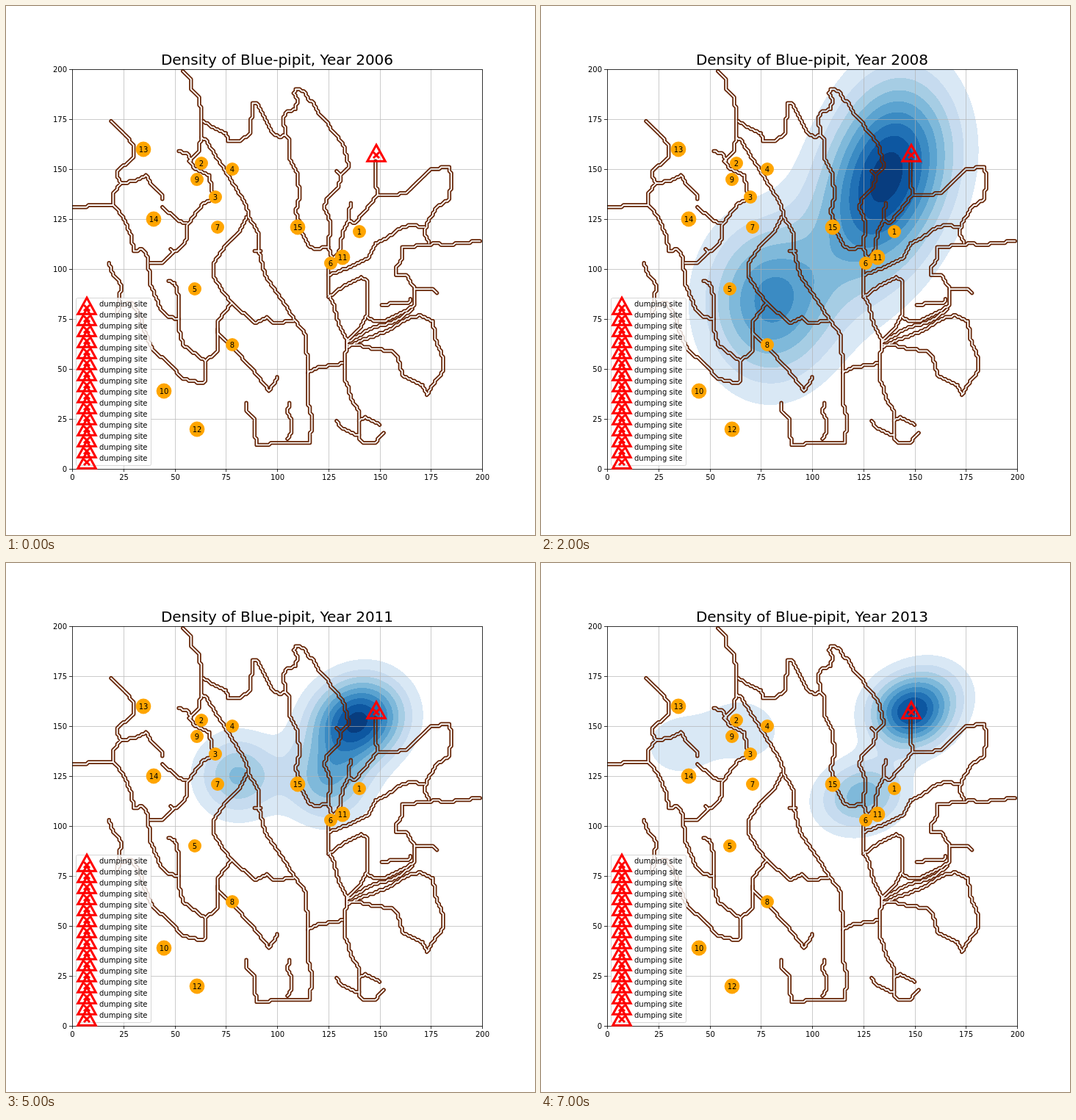
Animation of 720 by 720 pixels, one loop 8000 ms. Source, as an HTML page with a canvas:

```html
<!DOCTYPE html>
<html lang="en">
<head>
<meta charset="utf-8">
<title>Density map</title>
<style>
html, body { margin: 0; width: 100%; height: 100%; overflow: hidden; background: #fff; }
canvas { position: absolute; left: 90px; top: 86px; }
svg { position: absolute; left: 0; top: 0; }
text { font: 10px "DejaVu Sans", sans-serif; }
#title { font-size: 20px; }
.mid { text-anchor: middle; }
.end { text-anchor: end; }
</style>
</head>
<body>
<canvas id="density" width="558" height="544"></canvas>
<svg width="720" height="720" viewBox="0 0 720 720">
  <defs>
    <g id="roads" fill="none" stroke-linecap="round" stroke-linejoin="round">
      <polyline points="144,156 160,172 174,190 173,206 151,224 152,234 158,240 147,254 146,270 160,286 164,300 172,315 173,333 186,331 194,342 195,380 202,392 210,412 220,422 234,427"/>
      <polyline points="84,274 108,274 113,271 136,271 146,272"/>
      <polyline points="158,240 175,238 190,230 196,242 212,258 213,263"/>
      <polyline points="196,350 212,350 225,338 242,324 246,318 245,298 255,288 268,268 284,260"/>
      <polyline points="214,275 230,287 240,296 246,295"/>
      <polyline points="223,331 228,336"/>
      <polyline points="242,90 251,99 252,112 262,125 266,150 267,178 262,188 263,198 250,210 258,222 276,231 279,250 285,262"/>
      <polyline points="236,198 245,201 252,210"/>
      <polyline points="267,178 272,180 288,208 303,230 318,257 328,270 330,287 344,308 345,330 352,365 375,400 395,430 409,447 411,500 410,540 416,562 413,594 362,594 357,598 341,597 338,582 337,562 328,550 327,541"/>
      <polyline points="338,333 348,333"/>
      <polyline points="268,157 285,167 300,172 303,184 318,184 332,172 336,133 342,133 352,152 360,170 372,179 381,177"/>
      <polyline points="381,177 377,150 384,143 395,140 397,126 391,119 395,114 401,112 408,120 411,128 420,131 425,146 437,157 443,170 457,186 463,205 467,218 455,230 452,247 435,263 433,275 441,295 440,328"/>
      <polyline points="450,226 455,230"/>
      <polyline points="381,177 385,180 387,205 397,230 399,260 395,280 402,305 412,325 420,331 440,327"/>
      <polyline points="440,327 443,345 438,360 438,392 446,410 452,435 463,455 460,487 462,510 468,520 470,535 481,550 481,590 486,595 502,594 508,586 514,580"/>
      <polyline points="481,565 490,560 500,566 508,570"/>
      <polyline points="449,566 456,573 470,580 481,583"/>
      <polyline points="438,395 462,380 482,368 491,373 491,420 480,440 463,455"/>
      <polyline points="440,367 470,355 495,342 503,322 520,315 540,300 553,298 571,300"/>
      <polyline points="503,212 503,240 507,258 523,258 545,255 560,242 577,222 602,219 607,235 604,262 588,275 572,295 570,308 576,322"/>
      <polyline points="507,258 495,272 485,282 475,296 468,293 466,283 470,268"/>
      <polyline points="468,291 458,307 456,325 452,335 443,345"/>
      <polyline points="645,320 620,322 600,326 585,322 573,325 540,327 538,345 532,355 532,365 545,366 553,380 556,385 580,384 587,390"/>
      <polyline points="556,385 555,408 540,418 515,428 500,429 491,422"/>
      <polyline points="511,407 530,405 548,403 550,400"/>
      <polyline points="463,463 490,452 520,443 545,427 565,420 582,428 585,450 594,480 594,498 580,515 573,530 566,517 540,502 533,478 525,470 500,467 480,462 465,460"/>
      <polyline points="463,458 495,440 530,428 553,412"/>
      <polyline points="411,500 425,490 450,488 459,487"/>
      <polyline points="328,288 318,305 300,325 283,350 283,370 296,392 308,405 337,432 355,422 363,432 392,430"/>
      <polyline points="308,403 288,430 289,445 308,465 335,495 357,525 363,515 370,505"/>
      <polyline points="289,440 287,470 272,482 272,510 265,514 240,508 220,487 200,468 188,440 182,420 172,405 155,408 150,417"/>
      <polyline points="139,350 143,362 156,380 155,398 150,417"/>
      <polyline points="222,374 230,378 234,400 235,440 242,460 260,475 272,482"/>
      <polyline points="385,541 382,555 388,562 388,578 382,590"/>
    </g>
    <mask id="outline" maskUnits="userSpaceOnUse" x="90" y="86" width="558" height="544">
      <use href="#roads" stroke="#fff" stroke-width="5.4"/>
      <use href="#roads" stroke="#000" stroke-width="1.9"/>
    </mask>
    <g id="site" fill="none" stroke="#f00" stroke-width="3">
      <path d="M0-14L12.2 8.2H-12.2Z"/>
      <path d="M-4-4L4 4M-4 4L4-4"/>
    </g>
  </defs>
  <path id="grid" stroke="#b0b0b0" stroke-width=".8" opacity=".8"/>
  <rect x="90" y="86" width="558" height="544" fill="#662506" mask="url(#outline)"/>
  <path id="ticks" stroke="#000" stroke-width=".8"/>
  <rect x="90.5" y="86.5" width="558" height="544" fill="none" stroke="#000" stroke-width=".8"/>
  <use href="#site" x="504" y="203"/>
  <g id="spots"></g>
  <rect x="95.5" y="397.5" width="102" height="228" rx="2" fill="#fff" fill-opacity=".8" stroke="#ccc" stroke-opacity=".8"/>
  <g id="legend"></g>
  <g id="labels"></g>
  <text id="title" class="mid" x="369" y="80"></text>
</svg>
<script>
const $ = id => document.getElementById(id);
const W = 558, H = 544, LEFT = 90, TOP = 86;

// Roads run along a 200 x 200 cell grid, so every polyline becomes a staircase.
const CW = W / 200, CH = H / 200;
function stepped(points) {
  const cells = points.split(' ').map(p => {
    const [x, y] = p.split(',');
    return [Math.round((x - LEFT) / CW), Math.round((y - TOP) / CH)];
  });
  const out = [cells[0]];
  for (let i = 1; i < cells.length; i++) {
    const [ax, ay] = cells[i - 1], [bx, by] = cells[i];
    const n = Math.max(Math.abs(bx - ax), Math.abs(by - ay));
    for (let k = 1; k <= n; k++) {
      out.push([Math.round(ax + (bx - ax) * k / n), Math.round(ay + (by - ay) * k / n)]);
    }
  }
  return out.map(([x, y]) => (LEFT + x * CW).toFixed(1) + ',' + (TOP + y * CH).toFixed(1)).join(' ');
}
for (const road of $('roads').children) {
  road.setAttribute('points', stepped(road.getAttribute('points')));
}

// Axes
let grid = '', ticks = '', labels = '';
for (let i = 0; i <= 8; i++) {
  const x = Math.round(LEFT + i * W / 8) + .5, y = Math.round(630 - i * H / 8) + .5;
  if (i % 8) grid += `M${x} 86V630M90 ${y}H648`;
  ticks += `M${x} 630v4M90 ${y}h-4`;
  labels += `<text class="mid" x="${x}" y="645">${i * 25}</text>
    <text class="end" x="83" y="${y + 3.5}">${i * 25}</text>`;
}
$('grid').setAttribute('d', grid);
$('ticks').setAttribute('d', ticks);
$('labels').innerHTML = labels;

// Numbered spots, in order from 1
const spots = [[481, 307], [266, 214], [285, 260], [308, 222], [257, 385], [442, 350], [288, 301], [308, 461],
  [260, 236], [215, 524], [458, 342], [260, 576], [187, 195], [201, 290], [397, 301]];
$('spots').innerHTML = spots.map(([x, y], i) =>
  `<circle cx="${x}" cy="${y}" r="${i < 9 ? 9 : 10.4}" fill="orange"/>
   <text class="mid" x="${x}" y="${y + 3.6}">${i + 1}</text>`).join('');

let legend = '';
for (let i = 0; i < 15; i++) {
  legend += `<use href="#site" x="110" y="${411 + i * 15}"/>
    <text x="127" y="${409 + i * 15}">dumping site</text>`;
}
$('legend').innerHTML = legend;

// Kernel density per year: bandwidth, peak level and weighted points [x, y, weight]
const years = [
  { bw: [40, 30], peak: 0, pts: [] },
  { bw: [40, 30], peak: .97, pts: [[535, 212, 1], [486, 207, 1.1], [430, 186, .35], [375, 287, .65], [432, 281, .35]] },
  { bw: [53, 73], peak: .96, pts: [[493, 188, 1], [452, 265, 1], [415, 345, .25], [288, 402, .57], [332, 402, .62]] },
  { bw: [13, 52], peak: .87, pts: [[467, 187, 1], [485, 260, .5], [480, 310, .4], [474, 372, .65], [443, 300, .5], [497, 190, .35]] },
  { bw: [16, 58], peak: .92, pts: [[470, 215, 1], [490, 265, .6], [444, 310, .6], [474, 360, .6], [472, 455, .6], [510, 230, .5]] },
  { bw: [38, 38], peak: .95, pts: [[495, 205, 1], [460, 223, .9], [437, 297, .8], [315, 289, .75]] },
  { bw: [35, 32], peak: .92, pts: [[500, 203, 1.2], [515, 210, .3], [470, 235, .5], [445, 295, .5]] },
  { bw: [36, 32], peak: .92, pts: [[500, 205, 1.3], [535, 174, .4], [448, 310, .55], [412, 328, .3], [187, 248, .28], [283, 230, .22], [255, 217, .1]] }
];

const blues = ['#d9e8f5', '#c6dbef', '#a6cde4', '#7fb9da', '#5ba3d0', '#3b8bc3', '#2171b5', '#0d57a1', '#083d7f']
  .map(c => [1, 3, 5].map(i => parseInt(c.slice(i, i + 2), 16)));

const bell = (n, mu, s) => Float32Array.from({ length: n }, (_, i) => Math.exp(-(((i - mu) / s) ** 2) / 2));

function contours({ bw, peak, pts }) {
  const img = new ImageData(W, H), sum = new Float32Array(W * H);
  let max = 0;
  const bells = pts.map(([x, y, w]) => [bell(W, x - LEFT, bw[0]), bell(H, y - TOP, bw[1]), w]);
  for (let y = 0, p = 0; y < H; y++) {
    for (let x = 0; x < W; x++, p++) {
      for (const [bx, by, w] of bells) sum[p] += w * bx[x] * by[y];
      if (sum[p] > max) max = sum[p];
    }
  }
  if (!max) return img;
  sum.forEach((v, p) => {
    const band = Math.floor(v / max * peak * 10);
    if (band > 0) img.data.set([...blues[band - 1], 255], p * 4);
  });
  return img;
}

const maps = years.map(contours);
const ctx = $('density').getContext('2d');
let shown = -1;
function frame() {
  const i = Math.floor(performance.now() % 8000 / 1000);
  if (i !== shown) {
    shown = i;
    ctx.putImageData(maps[i], 0, 0);
    $('title').textContent = 'Density of Blue-pipit, Year ' + (2006 + i);
  }
  requestAnimationFrame(frame);
}
frame();
</script>
</body>
</html>
```
